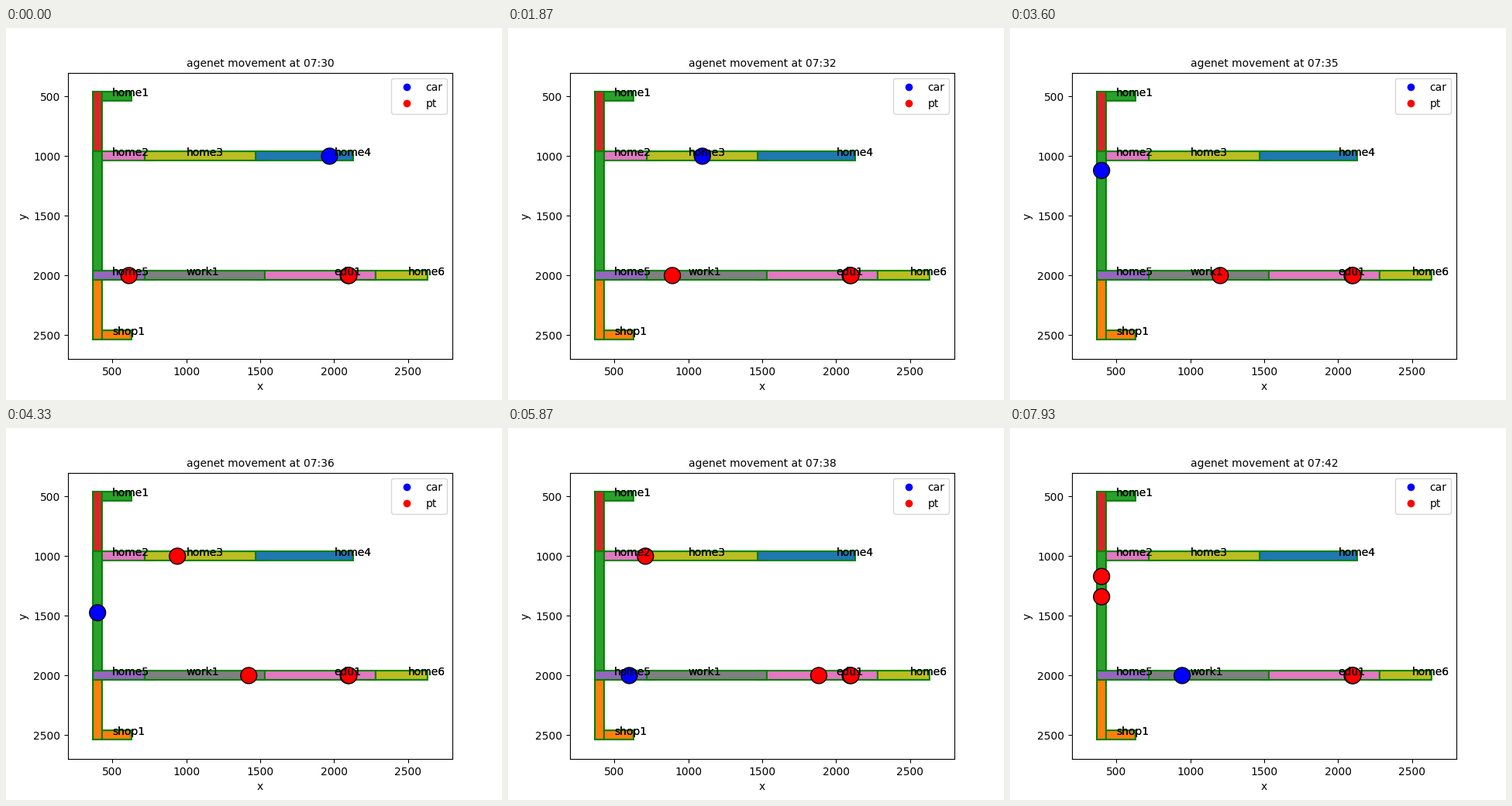
Animation, 640 px wide and 480 px high, one loop 8000 ms. Source, as a matplotlib script:

```python
import math

import matplotlib.pyplot as plt
from matplotlib.animation import FuncAnimation
from matplotlib.lines import Line2D

FRAMES = 120
INTERVAL = 66.6
SECONDS_PER_STEP = 6

# speeds in map units per step
WALK, BUS, RIDE, DRIVE = 10, 20, 27, 31.2

fig, ax = plt.subplots(figsize=(6.4, 4.8), dpi=100)
ax.set_xlim(200, 2800)
ax.set_ylim(2700, 300)
ax.set_xlabel("x")
ax.set_ylabel("y")
title = ax.text(0.5, 1.02, "", transform=ax.transAxes, ha="center")


def road(xs, ys, color):
    for width, c in ((10, "green"), (7, "tab:" + color)):
        ax.plot(xs, ys, color=c, linewidth=width)


def street(y, xs, colors):
    for x0, x1, color in zip(xs, xs[1:], colors):
        road([x0, x1], [y, y], color)


# later roads cover earlier ones where they join
street(500, [400, 600], ["green"])
street(2500, [400, 600], ["orange"])
street(1000, [400, 750, 1500, 2100], ["pink", "olive", "blue"])
road([400, 400], [500, 1000], "red")
road([400, 400], [2000, 2500], "orange")
road([400, 400], [1000, 2000], "green")
street(2000, [2600, 2250, 1500], ["olive", "pink"])
street(2000, [400, 750, 1500], ["purple", "gray"])

PLACES = {
    500: {"home1": 500},
    1000: {"home2": 500, "home3": 1000, "home4": 2000},
    2000: {"home5": 500, "work1": 1000, "edu1": 2000, "home6": 2500},
    2500: {"shop1": 500},
}
for y, row in PLACES.items():
    for name, x in row.items():
        for _ in range(2):  # doubled for a slightly heavier look
            ax.text(x, y, name)

ax.legend(handles=[
    Line2D([0], [0], marker="o", color="w", markerfacecolor=c,
           markersize=8, label=label)
    for c, label in (("blue", "car"), ("red", "pt"))
], loc="upper right")

# colour, first step, start point, then legs of (x, y, speed)
AGENTS = [
    ("blue", 0, (1969, 1000),
     [(400, 1000, DRIVE), (400, 2000, DRIVE + 1), (945, 2000, DRIVE - 1)]),
    ("red", 0, (2095, 2000), []),
    ("red", 0, (2100, 2000), []),
    ("red", 0, (612.5, 2000), [(1102.5, 2000, WALK), (2100, 2000, BUS)]),
    ("red", 59, (1000, 1000),
     [(600, 1000, WALK), (400, 1000, RIDE), (400, 2000, RIDE)]),
    ("red", 109, (500, 1000), [(400, 1000, RIDE), (400, 2000, RIDE)]),
]

dots = ax.scatter([], [], s=225, edgecolors="black", linewidths=1, zorder=2.5)


def position(start, legs, elapsed):
    x, y = start
    for x1, y1, speed in legs:
        duration = math.hypot(x1 - x, y1 - y) / speed
        if elapsed < duration:
            k = elapsed / duration
            return x + k * (x1 - x), y + k * (y1 - y)
        elapsed -= duration
        x, y = x1, y1
    return x, y


def update(step):
    active = [a for a in AGENTS if step >= a[1]]
    dots.set_offsets([position(start, legs, step - first)
                      for _, first, start, legs in active])
    dots.set_facecolors([a[0] for a in active])
    minute = 30 + (step + 1) * SECONDS_PER_STEP // 60
    title.set_text(f"agenet movement at 07:{minute:02d}")
    return dots, title


anim = FuncAnimation(fig, update, frames=FRAMES, interval=INTERVAL,
                     init_func=lambda: update(0), repeat=True, repeat_delay=0)
plt.show()
```
